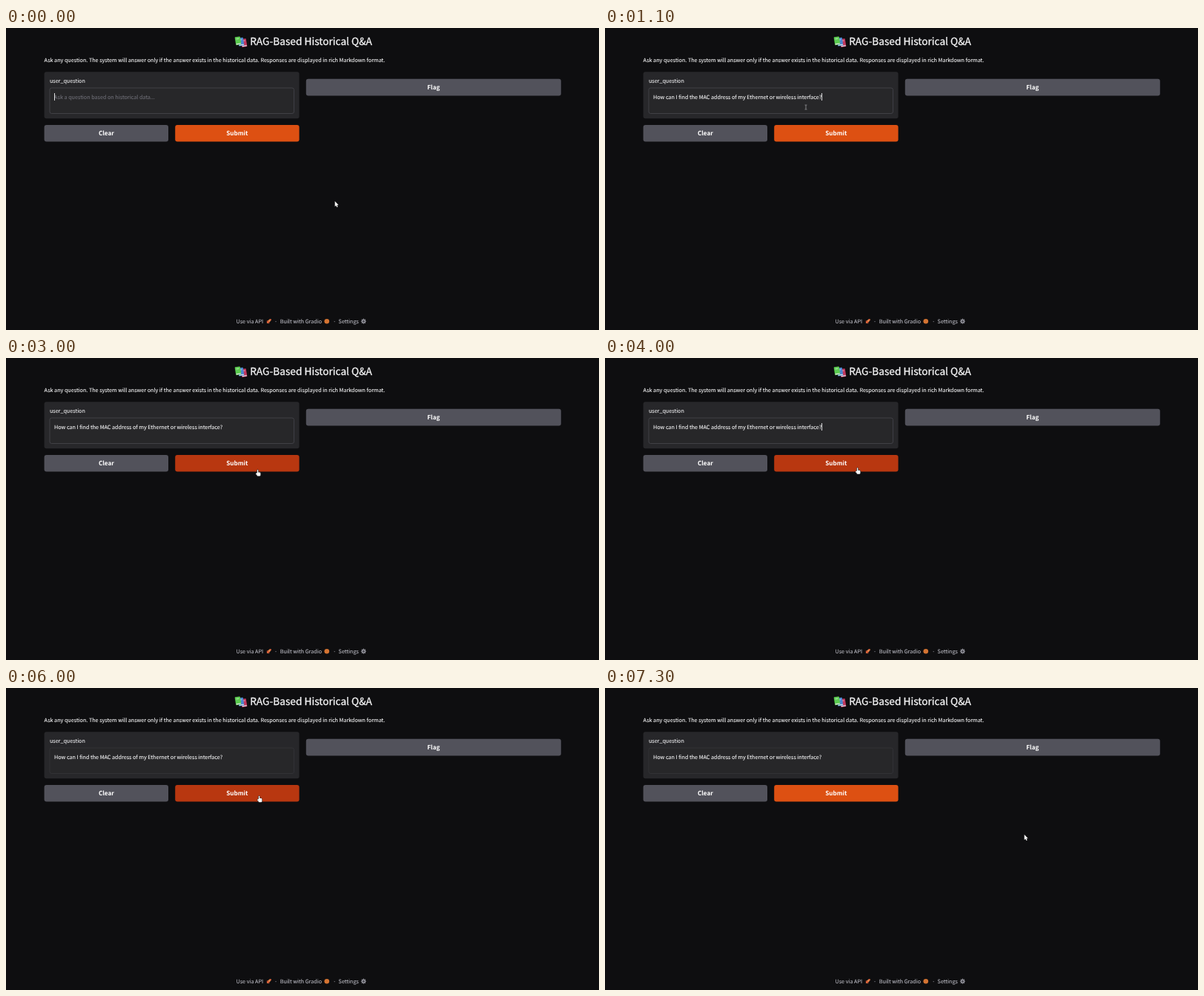
These frames come from a looping animation (800 px wide and 408 px high, 8000 ms). An HTML page with a canvas:

```html
<!DOCTYPE html>
<html lang="en">
<head>
<meta charset="utf-8">
<title>RAG-Based Historical Q&amp;A</title>
<style>
  html, body { margin: 0; width: 100%; height: 100%; overflow: hidden; background: #0e0e10; }
  canvas { display: block; width: 800px; height: 408px; }
</style>
</head>
<body>
<canvas id="stage"></canvas>
<script>
const LOOP = 8000;
const FONT = '"Noto Sans CJK SC", "Noto Sans CJK JP", "Noto Sans", sans-serif';
const QUESTION = 'How can I find the MAC address of my Ethernet or wireless interface?';
const PASTE_AT = 1000, BLUR_AT = 5000, BLINK = 700;

const LEFT = 51.6, COLUMN = 344, GAP = 9.2, BUTTON_H = 22.6;
const half = (COLUMN - GAP) / 2;
const PANEL = { x: LEFT, y: 59.2, w: COLUMN, h: 63 };
const INPUT = { x: 59, y: 81, w: 329.5, h: 34.5 };
const CLEAR = { x: LEFT, y: 131, w: half, h: BUTTON_H };
const SUBMIT = { x: LEFT + half + GAP, y: 131, w: half, h: BUTTON_H };
const FLAG = { x: LEFT + COLUMN + GAP, y: 68.8, w: COLUMN, h: BUTTON_H };

const POINTER_START = { x: 443.7, y: 234 };
const MOVES = [
  { from: 100, to: 480, x: 263.3, y: 134.3 },
  { from: 530, to: 800, x: 271, y: 107 },
  { from: 2480, to: 2900, x: 339, y: 151 },
  { from: 3960, to: 4040, x: 341, y: 145.7 },
  { from: 6030, to: 6400, x: 565.7, y: 198 }
];

const canvas = document.getElementById('stage');
const ratio = window.devicePixelRatio || 1;
canvas.width = 800 * ratio;
canvas.height = 408 * ratio;
const ctx = canvas.getContext('2d');
ctx.scale(ratio, ratio);
ctx.textRendering = 'geometricPrecision';
ctx.lineJoin = 'round';

// Draws a label and returns its width.
function text(str, x, y, { size = 7.19, weight = 400, color = '#f4f4f5', align = 'left', heavy = 0.12 } = {}) {
  ctx.font = `${weight} ${size}px ${FONT}`;
  ctx.textAlign = align;
  ctx.fillStyle = ctx.strokeStyle = color;
  ctx.lineWidth = heavy;
  ctx.fillText(str, x, y);
  ctx.strokeText(str, x, y);
  return ctx.measureText(str).width;
}

function box({ x, y, w, h }, fill, radius = 3, border) {
  ctx.beginPath();
  ctx.roundRect(x, y, w, h, radius);
  ctx.fillStyle = fill;
  ctx.fill();
  if (border) {
    ctx.lineWidth = 0.8;
    ctx.strokeStyle = border;
    ctx.stroke();
  }
}

function dot(x, y, r, fill) {
  ctx.beginPath();
  ctx.arc(x, y, r, 0, Math.PI * 2);
  ctx.fillStyle = fill;
  ctx.fill();
}

function at(x, y, angle, paint) {
  ctx.save();
  ctx.translate(x, y);
  ctx.rotate(angle);
  paint();
  ctx.restore();
}

// Fills a shape over its own dark outline.
function outlined(path) {
  ctx.lineWidth = 1;
  ctx.strokeStyle = '#101012';
  ctx.fillStyle = '#f8f8f8';
  ctx.stroke(path);
  ctx.fill(path);
}

function button(label, rect, fill) {
  box(rect, fill);
  text(label, rect.x + rect.w / 2, rect.y + rect.h / 2 + 3,
    { size: 8.15, weight: 700, color: '#ffffff', align: 'center', heavy: 0.01 });
}

const inside = (p, r) => p.x > r.x && p.x < r.x + r.w && p.y > r.y && p.y < r.y + r.h;

function pointerAt(t) {
  return MOVES.reduce((p, move) => {
    const u = Math.min(1, Math.max(0, (t - move.from) / (move.to - move.from)));
    const k = u * u * (3 - 2 * u);
    return { x: p.x + (move.x - p.x) * k, y: p.y + (move.y - p.y) * k };
  }, POINTER_START);
}

function caretLit(t) {
  if (t >= BLUR_AT) return false;
  const blinkStart = t >= PASTE_AT ? 600 : -300;
  return Math.floor((t - blinkStart) / BLINK) % 2 === 0;
}

function books() {
  ['#c2385f', '#4a86cf', '#5bcb50'].forEach((cover, i) => {
    at(321 - i * 4, 20 - i * 1.4, -0.16, () => {
      box({ x: -3.6, y: -5.4, w: 7.2, h: 11 }, cover, 0.8);
      box({ x: -3, y: 3.7, w: 6.2, h: 1.2 }, '#e6e2ea', 0.3);
      box({ x: -1.9, y: -3.6, w: 3.8, h: 1.6 }, '#ffffff66', 0.3);
    });
  });
}

function rocket() {
  at(354.8, 396, Math.PI / 4, () => {
    ctx.beginPath();
    ctx.ellipse(0, 0, 1.5, 3.8, 0, 0, Math.PI * 2);
    ctx.fillStyle = '#e38a4c';
    ctx.fill();
    box({ x: -2.3, y: 1, w: 4.6, h: 1.5 }, '#cf4b31', 0.7);
    dot(0, -2.6, 0.9, '#d9503a');
  });
}

function gear(x, y) {
  const metal = '#94949c';
  for (let i = 0; i < 8; i++) {
    at(x, y, i * Math.PI / 4, () => box({ x: 2, y: -0.5, w: 1.6, h: 1 }, metal, 0.2));
  }
  dot(x, y, 2.6, metal);
  dot(x, y, 1.2, '#3f3f46');
}

function footer() {
  const style = { color: '#b4b4bc' };
  text('Use via API', 310.6, 398.9, style);
  rocket();
  text('Built with Gradio', 369.8, 398.9, style);
  dot(432.8, 396.2, 3.3, '#d47432');
  text('Settings', 448.6, 398.9, style);
  gear(482.4, 396.2);
  for (const x of [364, 443.2]) dot(x, 396.6, 0.7, '#85858d');
}

function arrow() {
  outlined(new Path2D('M0 0V7.2L1.6 5.8L2.7 8.2L3.9 7.6L2.9 5.3L5 5.2Z'));
}

function hand() {
  const shape = new Path2D();
  shape.roundRect(-0.2, 0, 1.5, 6, 0.7);
  shape.roundRect(-0.6, 3.4, 5, 5.2, 1.4);
  shape.roundRect(-1.9, 4.6, 2.4, 2, 0.9);
  outlined(shape);
}

function beam() {
  const color = '#a8a8ac';
  box({ x: -0.35, y: -3, w: 0.7, h: 6 }, color, 0);
  for (const y of [-3.3, 2.7]) box({ x: -1.5, y, w: 3, h: 0.6 }, color, 0);
}

function draw(t) {
  const pointer = pointerAt(t);
  const overSubmit = inside(pointer, SUBMIT);
  const pasted = t >= PASTE_AT;

  ctx.fillStyle = '#0e0e10';
  ctx.fillRect(0, 0, 800, 408);

  books();
  text('RAG-Based Historical Q&A', 329.2, 23.2, { size: 13.7, heavy: 0.3 });
  text('Ask any question. The system will answer only if the answer exists in the historical data. ' +
    'Responses are displayed in rich Markdown format.', LEFT, 46.3);

  box(PANEL, '#27272a');
  text('user_question', 58.9, 74.3, { color: '#e8e8ea' });
  box(INPUT, '#272729', 2.5, t < BLUR_AT ? '#47474d' : '#353539');
  const typed = pasted
    ? text(QUESTION, 65, 95.7)
    : (text('Ask a question based on historical data...', 65, 95.7, { color: '#6c6c74' }), 0);
  if (caretLit(t)) box({ x: 65 + typed, y: 88, w: 0.9, h: 10 }, '#f4f4f5', 0);

  button('Clear', CLEAR, '#52525b');
  button('Submit', SUBMIT, overSubmit ? '#b83710' : '#dd5012');
  button('Flag', FLAG, '#52525b');
  footer();

  const cursor = overSubmit ? hand : inside(pointer, INPUT) ? beam : arrow;
  at(pointer.x, pointer.y, 0, cursor);
}

const start = performance.now();
function tick() {
  draw((performance.now() - start) % LOOP);
  requestAnimationFrame(tick);
}
tick();
</script>
</body>
</html>
```
